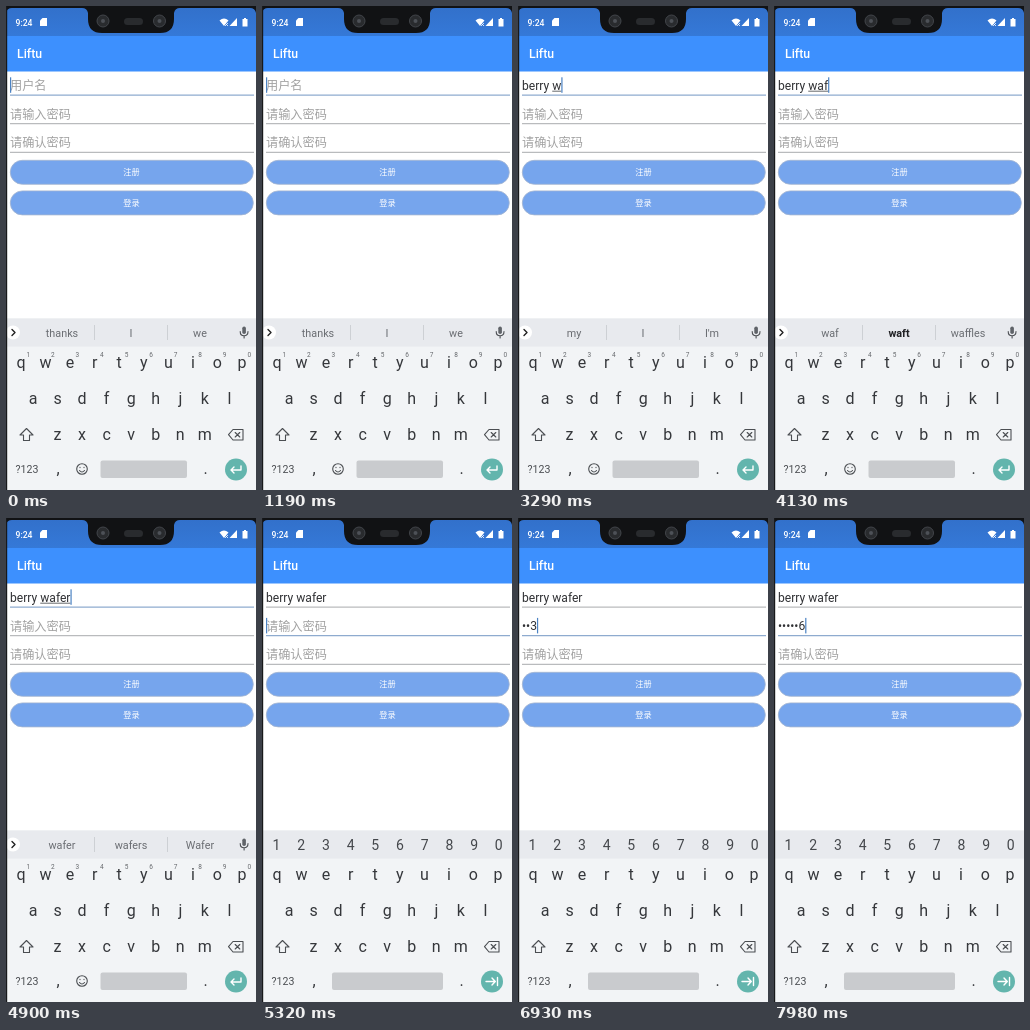
These frames come from a looping animation (250x484 px, 8 s). An HTML page:

```html
<!DOCTYPE html>
<html lang="zh">
<head>
<meta charset="utf-8">
<title>Sign-up form</title>
<style>
  html, body { margin: 0; width: 100%; height: 100%; overflow: hidden; background: #fff; }
  svg { display: block; width: 100vw; height: 100vh; }
  text { font-family: Roboto, "Noto Sans CJK SC", "Noto Sans CJK", sans-serif; white-space: pre; }
  .mid { text-anchor: middle; }
  .field { font-size: 12.1px; fill: #303134; }
  .hint { font-size: 12.2px; fill: #a2a2a2; }
  .key { font-size: 16px; fill: #35373b; }
  .digit { font-size: 14px; fill: #44474b; }
  .small { font-size: 6.5px; fill: #66696d; }
  .word { font-size: 10.8px; fill: #6a6d72; }
  .word.strong { font-weight: 700; fill: #202124; }
  .icon { fill: none; stroke: #4b4e52; stroke-width: 1.1; stroke-linejoin: round; stroke-linecap: round; }
</style>
</head>
<body>
<svg viewBox="0 0 250 484" preserveAspectRatio="none">
  <defs>
    <linearGradient id="status" x2="0" y2="1">
      <stop offset="0" stop-color="#3270ca"/><stop offset="1" stop-color="#3579d8"/>
    </linearGradient>
  </defs>
  <rect width="250" height="484" fill="#fff"/>

  <!-- status bar, notch, title -->
  <rect width="250" height="31" fill="url(#status)"/>
  <rect y="30" width="250" height="35.5" fill="#3d90fe"/>
  <path d="M0 0H250V7Q249 2 244 2H174Q169 2 168 7V13Q168 27 154 27H96Q82 27 82 13V7Q81 2 76 2H6Q1 2 0 7Z" fill="#111214"/>
  <g fill="#292b2e" stroke="#42454a">
    <circle cx="97" cy="15" r="6"/><circle cx="153.500" cy="15" r="6"/>
    <rect x="118" y="12" width="19" height="7" rx="3.500" stroke="none"/>
  </g>
  <g fill="#4d5157"><circle cx="97" cy="15" r="2"/><circle cx="153.500" cy="15" r="2"/></g>
  <g fill="#fff">
    <text x="9.500" y="19.500" font-size="8.600" font-weight="500">9:24</text>
    <path d="M36.500 12H41V20H34V14.500Z"/>
    <path d="M213.500 14.500Q218 10.500 222.500 14.500L218 20Z"/>
    <path d="M231 12V20H223.500Z"/>
    <path d="M236.500 13H238V12H240V13H241.500V20.500H236.500Z"/>
    <text x="11" y="52.300" font-size="12.300" font-weight="500">Liftu</text>
  </g>
  <path d="M219 17L222 20M222 17L219 20" stroke="#fff" stroke-width=".8"/>

  <g id="form"></g>
  <path id="compose" stroke="#55585c" stroke-width=".9"/>
  <rect id="caret" width="1.200" height="15.500" fill="#4c83c3"/>

  <!-- keyboard -->
  <rect y="312.500" width="250" height="172" fill="#f2f4f6"/>
  <rect y="312.500" width="250" height="28" fill="#e8eaee"/>
  <g id="keys"></g>
  <g class="icon">
    <path d="M20.500 422.500L27 429H23.500V434.500H17.500V429H14Z"/>
    <path d="M227 423.500H237V434H227L222.500 428.700Z"/>
    <path d="M229.200 426.500L233.800 431M233.800 426.500L229.200 431"/>
  </g>
  <circle cx="230" cy="463.500" r="11" fill="#63b5ad"/>
  <g id="textMode">
    <circle cx="7" cy="326.500" r="7" fill="#fff"/>
    <path d="M6 323.500L9 326.500L6 329.500" class="icon" style="stroke:#222;stroke-width:1.400"/>
    <path d="M88.500 319V334M161.500 319V334" stroke="#cdd0d4"/>
    <rect x="236.300" y="320.500" width="3.600" height="7.500" rx="1.800" fill="#5f6368"/>
    <path d="M234.200 325.500Q234.200 329.800 238.100 329.800T242 325.500M238.100 330V332" class="icon"/>
    <circle cx="76" cy="463" r="5.300" class="icon"/>
    <path d="M73.500 464.500Q76 467.500 78.500 464.500M74 461.300V461.600M78 461.300V461.600" class="icon"/>
    <rect x="94.500" y="454.500" width="86.500" height="17.500" rx="2" fill="#c9cbce"/>
    <path d="M235 460V464H225.500M228 461L225 464L228 467" class="icon" style="stroke:#fff;stroke-width:1.400"/>
  </g>
  <g id="passMode">
    <rect x="70" y="454.500" width="111" height="17.500" rx="2" fill="#c9cbce"/>
    <path d="M224 463.500H233M230 460L233.300 463.500L230 467M235.500 459.500V467.500" class="icon" style="stroke:#fff;stroke-width:1.400"/>
  </g>
  <rect width="1.200" height="484" fill="#18191b"/>
</svg>
<script>
const LOOP = 8000, FOCUS_PASS = 5110, SUGGEST_LAG = 110;
const NAME = 'berry wafer', PASS = '123456';
const nameTimes = [1890, 2170, 2450, 2590, 2800, 3010, 3220, 3570, 3920, 4270, 4550];
const passTimes = [5950, 6370, 6790, 7140, 7490, 7840];
const suggestions = [
  'thanks|I|we', 'b|be|but', 'be|bet|berry', 'ber|berry|best', 'berr|berry|berries',
  'berry|berries|Berry', "my|I|I'm", 'w|was|with', 'wa|was|want',
  'waf|*waft|waffles', 'wafe|*wafer|wafers', 'wafer|wafers|Wafer'
];

const $ = id => document.getElementById(id);
function add(parent, tag, attrs, content = '') {
  const node = document.createElementNS('http://www.w3.org/2000/svg', tag);
  for (const key in attrs) node.setAttribute(key, attrs[key]);
  node.textContent = content;
  return parent.appendChild(node);
}
const label = (parent, x, y, cls, content) => add(parent, 'text', { x, y, class: cls }, content);

const fields = ['用户名', '请输入密码', '请确认密码'].map((hint, i) => {
  const y = 83.6 + i * 28.6, form = $('form');
  return {
    y,
    hint: label(form, 4, y + .3, 'hint', hint),
    text: label(form, 4, y, 'field', ''),
    line: add(form, 'rect', { x: 4, y: y + 5, width: 244, height: 1 })
  };
});
['注册', '登录'].forEach((name, i) => {
  const y = 154.3 + i * 30.6;
  add($('form'), 'rect', { x: 4.3, y, width: 243, height: 24, rx: 12, fill: '#76a5ed', stroke: '#a5b5d0', 'stroke-width': .8 });
  add($('form'), 'text', { x: 125.5, y: y + 15, class: 'mid', 'font-size': 8.2, fill: '#fff' }, name);
});

function keyRow(letters, x, y) {
  [...letters].forEach((c, i) => label($('keys'), x + i * 24.55, y, 'key mid', c));
}
keyRow('qwertyuiop', 15, 362);
keyRow('asdfghjkl', 27, 398);
keyRow('zxcvbnm', 51.5, 434);
label($('keys'), 52, 468, 'key mid', ',');
label($('keys'), 199.5, 468, 'key mid', '.');
add($('keys'), 'text', { x: 21, y: 467, class: 'mid', 'font-size': 10.6, fill: '#4b4e52' }, '?123');
[...'1234567890'].forEach((c, i) => {
  label($('textMode'), 22.3 + i * 24.55, 350.5, 'small mid', c);
  label($('passMode'), 14.5 + i * 24.7, 332, 'digit mid', c);
});
const words = [56, 125, 194].map(x => label($('textMode'), x, 330.5, 'word mid', ''));

const countAt = (times, t) => times.filter(time => time <= t).length;

function draw(t) {
  const inPass = t >= FOCUS_PASS;
  const typed = countAt(nameTimes, t), entered = countAt(passTimes, t);
  const name = NAME.slice(0, typed);
  const pass = entered ? '•'.repeat(entered - 1) + PASS[entered - 1] : '';
  [name, pass, ''].forEach((value, i) => {
    const field = fields[i], active = i === +inPass;
    field.text.textContent = value;
    field.hint.style.display = value ? 'none' : '';
    field.line.setAttribute('fill', active ? '#7397c4' : '#a9abad');
  });

  suggestions[countAt(nameTimes, t - SUGGEST_LAG)].split('|').forEach((word, i) => {
    const strong = word[0] === '*';
    words[i].textContent = strong ? word.slice(1) : word;
    words[i].classList.toggle('strong', strong);
  });
  $('textMode').style.display = inPass ? 'none' : '';
  $('passMode').style.display = inPass ? '' : 'none';

  const field = fields[+inPass];
  const end = 4 + (inPass ? pass : name ? name : '').length * 0 + (field.text.textContent ? field.text.getComputedTextLength() : 0);
  const lastEdit = Math.max(0, ...[...nameTimes, FOCUS_PASS, ...passTimes].filter(time => time <= t));
  $('caret').setAttribute('x', end);
  $('caret').setAttribute('y', field.y - 12.3);
  $('caret').style.display = (t - lastEdit) % 1000 < 500 ? '' : 'none';

  const start = name.lastIndexOf(' ') + 1;
  const composing = !inPass && start < typed;
  const from = composing && start ? 4 + field.text.getSubStringLength(0, start) : 4;
  $('compose').setAttribute('d', composing ? `M${from} ${field.y + 1.6}H${end}` : '');
}

const began = performance.now();
function tick() {
  draw((performance.now() - began) % LOOP);
  requestAnimationFrame(tick);
}
tick();
</script>
</body>
</html>
```
